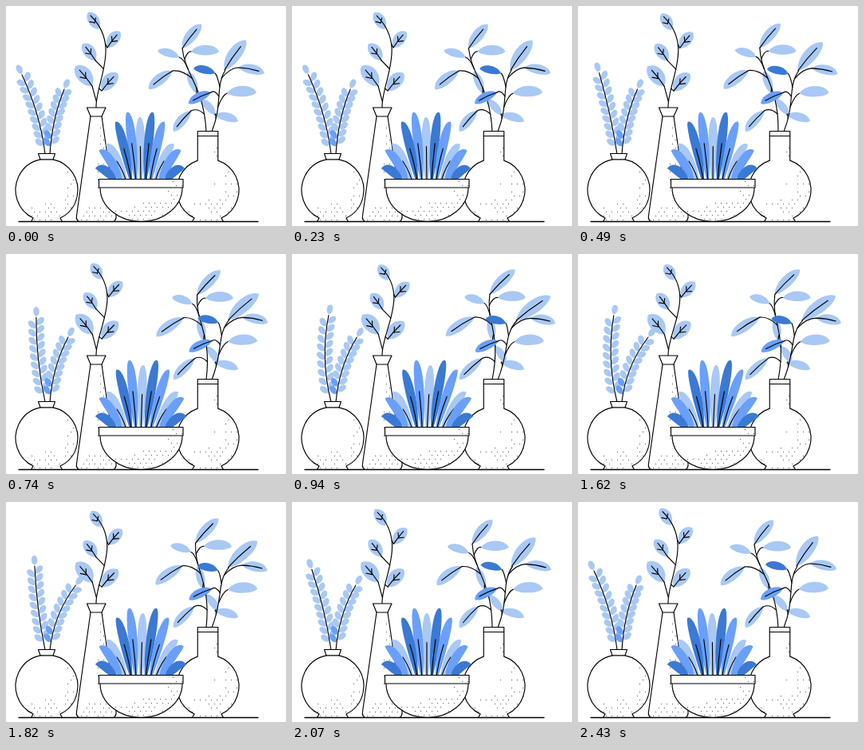
An HTML page with a canvas that plays this animation: 351 by 275 pixels, repeating every 2490 ms.

```html
<!DOCTYPE html>
<html lang="en">
<head>
<meta charset="utf-8">
<title>Swaying plants</title>
<style>
html, body { margin: 0; width: 100%; height: 100%; overflow: hidden; background: #fff; }
canvas { display: block; width: 351px; height: 275px; }
</style>
</head>
<body>
<canvas id="stage"></canvas>
<script>
const W = 351, H = 275, LOOP = 2490, GROUND = 269.5;
const LIGHT = '#a9c8f4', MID = '#6a9ffa', DARK = '#3b79d3', INK = '#000';
const canvas = document.getElementById('stage');
const ctx = canvas.getContext('2d');
const ratio = window.devicePixelRatio || 1;
canvas.width = W * ratio;
canvas.height = H * ratio;

// Smooth rise to 1 at the peak and back to 0 before the loop ends
function sway(t, peak) {
  const start = 90, end = 2410;
  const u = t < peak ? (t - start) / (peak - start) : (end - t) / (end - peak);
  const v = Math.min(1, Math.max(0, u));
  return v * v * v * (v * (v * 6 - 15) + 10);
}

const mix = (a, b, s) => a.map((v, i) => v + (b[i] - v) * s);

// Point on a Bezier curve of any degree
function curveAt(points, u) {
  while (points.length > 1) {
    points = points.slice(1).map((p, i) => mix(points[i], p, u));
  }
  return points[0];
}

function stroke(draw, width = 1.15) {
  ctx.beginPath();
  draw();
  ctx.strokeStyle = INK;
  ctx.lineWidth = width;
  ctx.stroke();
}

const line = (a, b, width) => stroke(() => {
  ctx.moveTo(...a);
  ctx.lineTo(...b);
}, width);

const arc = (a, c, b) => stroke(() => {
  ctx.moveTo(...a);
  ctx.quadraticCurveTo(...c, ...b);
});

// Point at share k of the way from a to b, moved sideways by off
function along(a, b, k, off) {
  const dx = b[0] - a[0], dy = b[1] - a[1], len = Math.hypot(dx, dy) || 1;
  return [a[0] + dx * k - dy / len * off, a[1] + dy * k + dx / len * off];
}

function drawLeaf(a, b, width, bend, color, k1 = 0.22, k2 = 0.85) {
  ctx.beginPath();
  ctx.moveTo(...a);
  ctx.bezierCurveTo(...along(a, b, k1, bend + width), ...along(a, b, k2, bend + width), ...b);
  ctx.bezierCurveTo(...along(a, b, k2, bend - width), ...along(a, b, k1, bend - width), ...a);
  ctx.fillStyle = color;
  ctx.fill();
}

const drawVein = (a, b, bend, reach) =>
  arc(a, along(a, b, reach / 2, bend), along(a, b, reach, bend * 0.5));

// Feathery stems: staggered leaves on both sides
function drawFern(stem, count, lowColor) {
  const put = (u, turn, color) => {
    const a = curveAt(stem, u), b = curveAt(stem, u + 0.01);
    const angle = Math.atan2(b[1] - a[1], b[0] - a[0]) + turn;
    const tip = [a[0] + 13.5 * Math.cos(angle), a[1] + 13.5 * Math.sin(angle)];
    drawLeaf(along(a, tip, 0.1, 0), tip, 5, 0, color, 0.15, 0.95);
  };
  for (let i = 0; i < count; i++) {
    const u = 0.1 + 0.86 * i / count;
    put(u, -0.75, i < 2 ? lowColor : LIGHT);
    put(u + 0.04, 0.75, LIGHT);
  }
  put(1, 0, LIGHT);
  arc(...stem);
}

function drawFerns(s, late) {
  drawFern([[49, 185], mix([43, 135], [34, 130], s), mix([20, 86], [50, 75], s)], 9, LIGHT);
  drawFern([[55, 185], mix([58, 140], [60, 140], late), mix([73, 104], [88, 104], late)], 8, MID);
}

// Leaves run from the top down, each as base, tip and an optional colour.
// Lean grows with height: reach pixels at 100 above the foot.
const SPRIG = {
  stem: [[113, 127], [112, 95], [145, 50], [106, 12]],
  leaves: [
    [[116, 29], [103, 8]],
    [[127, 52], [143, 32]],
    [[112, 68], [96, 47]],
    [[120, 106], [140, 84]],
    [[108, 100], [87, 75]]
  ],
  reach: 5, power: 2, drop: 0.9, width: 0.38, spread: 1.6, lift: 0, barbs: true
};
const TREE_LEFT = {
  stem: [[251, 157], [248, 100], [225, 88], [221, 53]],
  leaves: [
    [[221, 53], [245, 23]],
    [[232, 57], [267, 57]],
    [[217, 64], [190, 56]],
    [[209, 81], [179, 104]],
    [[239, 109], [228, 82]],
    [[244, 116], [262, 136]],
    [[232, 131], [210, 157]]
  ],
  reach: 30, power: 1, drop: -0.1, width: 0.24, spread: 1, lift: 6
};
const TREE_RIGHT = {
  stem: [[258, 157], [272, 122], [262, 100], [275, 80]],
  leaves: [
    [[274, 80], [301, 43]],
    [[291, 77], [324, 84]],
    [[262, 84], [235, 78], DARK],
    [[257, 108], [229, 122], MID],
    [[277, 109], [314, 108]],
    [[262, 136], [291, 144]]
  ],
  reach: 18, power: 3, drop: 0.42, width: 0.24, spread: 1, lift: 6
};

function drawPlant(plant, s) {
  const foot = plant.stem[0][1];
  const lean = ([x, y]) => {
    const d = s * plant.reach * (Math.max(0, foot - y) / 100) ** plant.power;
    return [x + d, y + d * plant.drop];
  };
  const stem = plant.stem.map(lean);
  const leaves = plant.leaves.map(([base, tip, color = LIGHT]) => {
    const len = Math.hypot(tip[0] - base[0], tip[1] - base[1]);
    const veined = len > 31 && Math.abs(tip[1] - base[1]) > 6;
    return { a: lean(base), b: lean(tip), len, color, veined, bend: (base[0] - tip[0]) * 0.07 };
  });
  for (const { a, b, len, bend, color } of leaves) drawLeaf(a, b, len * plant.width, bend, color);
  stroke(() => {
    ctx.moveTo(...stem[0]);
    ctx.bezierCurveTo(...stem[1], ...stem[2], ...stem[3]);
  });
  leaves.forEach(({ a, b, bend, veined }, i) => {
    const from = curveAt(stem, (1 - i / leaves.length) ** plant.spread);
    if (i > 0) arc(from, [(from[0] + a[0]) / 2, (from[1] + a[1]) / 2 - plant.lift], a);
    if (veined || plant.barbs && i > 0) drawVein(a, b, bend, 0.78);
    if (plant.barbs) {
      for (const side of [-4.5, 4.5]) line(along(a, b, 0.38, 0), along(a, b, 0.56, side));
    }
  });
}

// A fan of blades, drawn from the middle outwards
function drawBlades(s) {
  const colors = [DARK, MID, LIGHT, DARK, MID, LIGHT, DARK, MID, LIGHT, MID, DARK];
  const order = colors.map((_, i) => i - 5).sort((a, b) => Math.abs(a) - Math.abs(b));
  for (const k of order) {
    const color = colors[k + 5], far = Math.abs(k);
    const travel = 10 * Math.exp(-(((k - 2) / 3) ** 2));
    const base = [169 + 5.5 * k, 226];
    const tip = [168 + 57 * Math.sin(0.28 * k) + travel * s,
      127 + 76 * (far / 5) ** 1.6 + (color === LIGHT ? 12 : 0)];
    drawLeaf(base, tip, 7.6, -1.5 * k, color, 0.42, 1);
    if (far < 4) drawVein(base, tip, -1.5 * k, 0.58);
  }
}

function globe(cx, top, rim, neck) {
  const p = new Path2D(), r = 39, a = Math.acos(neck / r), b = 1.12;
  p.moveTo(cx - rim, top);
  p.lineTo(cx + rim, top);
  p.arc(cx, 230, r, -a, b);
  p.lineTo(cx + 19.5, GROUND);
  p.lineTo(cx - 19.5, GROUND);
  p.arc(cx, 230, r, Math.PI - b, Math.PI + a);
  p.closePath();
  return p;
}

const roundVase = globe(51, 184.5, 10.5, 8);
const bottle = globe(253, 156.5, 12.75, 12.75);
const tallVase = new Path2D('M101.5 127H125L120 138L138 262Q138.5 267 135 269.5H91.5Q87.5 267 88.5 262L106 138Z');
const rim = new Path2D('M116.5 216.5H222V227H116.5Z');
const bowl = new Path2D();
bowl.ellipse(169.5, 227, 51.5, GROUND - 227, 0, 0, Math.PI);

const noise = (x, y) => {
  const v = Math.sin(x * 12.9898 + y * 78.233) * 43758.5453;
  return v - Math.floor(v);
};

// Stipple gets denser below the shade line and towards the right edge
function drawVase(path, left, top, right, shade, edge) {
  ctx.fillStyle = '#fff';
  ctx.fill(path);
  ctx.save();
  ctx.clip(path);
  ctx.fillStyle = '#555';
  for (let row = 0, y = top; y < GROUND - 2; row++, y += 5) {
    for (let x = left + (row % 2) * 3.5; x < right; x += 7) {
      const chance = y > shade && x > edge - (y - shade) * 4 ? 0.65 : x > edge ? 0.4 : 0;
      if (noise(x, y) < chance) ctx.fillRect(Math.round(x), Math.round(y), 1, 1);
    }
  }
  ctx.restore();
  ctx.strokeStyle = INK;
  ctx.lineWidth = 1.15;
  ctx.stroke(path);
}

function drawScene(t) {
  const s = sway(t, 1270), late = sway(t, 1700);
  ctx.setTransform(ratio, 0, 0, ratio, 0, 0);
  ctx.fillStyle = '#fff';
  ctx.fillRect(0, 0, W, H);
  ctx.lineCap = ctx.lineJoin = 'round';

  drawFerns(s, late);
  drawVase(roundVase, 14, 197, 90, 240, 76);
  line([43, 191.8], [59, 191.8]);

  drawPlant(SPRIG, s);
  drawVase(tallVase, 90, 142, 138, 248, 114);
  line([106, 138], [120, 138]);

  drawPlant(TREE_LEFT, s);
  drawPlant(TREE_RIGHT, s);
  drawVase(bottle, 215, 167, 292, 240, 259);
  line([240.25, 162.5], [265.75, 162.5]);

  drawBlades(s);
  drawVase(bowl, 119, 231, 221, 238, 200);
  drawVase(rim, 118, 219, 221, 238, 206);
  line([16, GROUND], [316, GROUND], 1.3);
}

function tick(now) {
  drawScene(now % LOOP);
  requestAnimationFrame(tick);
}
drawScene(0);
requestAnimationFrame(tick);
</script>
</body>
</html>
```
